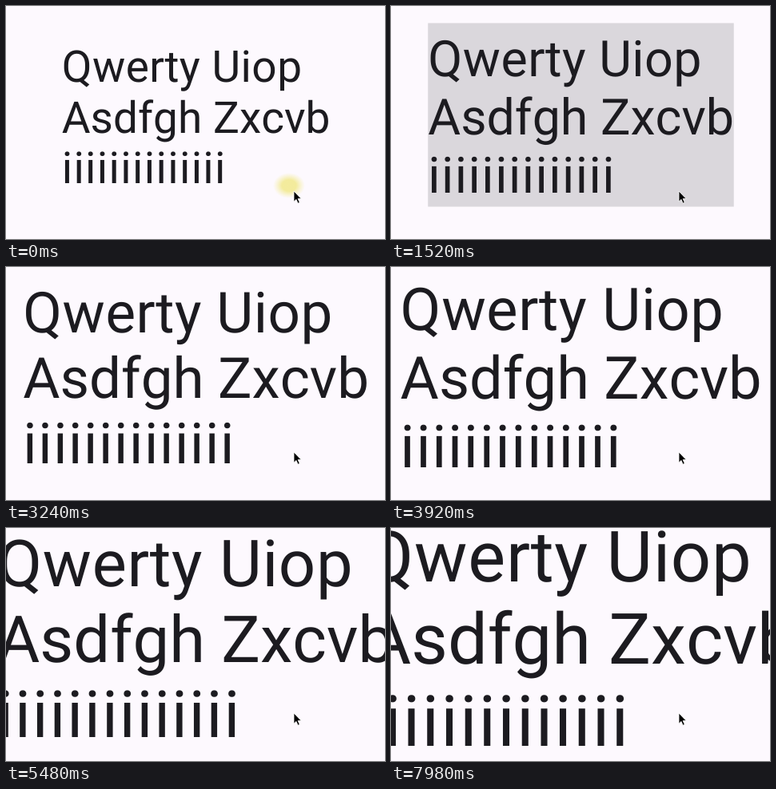
Write an HTML page that moves like this. It is 474 by 292 pixels and loops after 8 s.

```html
<!DOCTYPE html>
<html lang="en">
<head>
<meta charset="utf-8">
<title>Growing text</title>
<style>
  html, body { margin: 0; width: 100%; height: 100%; overflow: hidden; background: #fdf9fe; }
  svg { display: block; width: 474px; height: 292px; }
  text {
    font: 400 100px Roboto, sans-serif;
    font-kerning: none;
    text-rendering: geometricPrecision;
    fill: #1c1b20;
  }
</style>
</head>
<body>
<svg viewBox="0 0 474 292">
  <defs>
    <radialGradient id="ink" gradientUnits="userSpaceOnUse">
      <stop offset="0" stop-color="#bebcc1"/>
      <stop offset=".72" stop-color="#bfbdc1"/>
      <stop offset=".92" stop-color="#ccc5ca"/>
      <stop offset="1" stop-color="#d5d0d5" stop-opacity="0"/>
    </radialGradient>
    <radialGradient id="glow">
      <stop offset=".45" stop-color="#f3eb9c"/>
      <stop offset="1" stop-color="#f6efb0" stop-opacity="0"/>
    </radialGradient>
  </defs>
  <rect id="hover" fill="#dad7dc"/>
  <rect id="ripple" fill="url(#ink)"/>
  <ellipse id="tap" cx="354" cy="225" rx="20" ry="16" fill="url(#glow)"/>
  <g id="lines">
    <text y="-81.7" letter-spacing=".8">Qwerty Uiop</text>
    <text y="34.5">Asdfgh Zxcvb</text>
    <text y="150.7" letter-spacing="2.45">iiiiiiiiiiiiii</text>
  </g>
  <path d="M360 232v13.2l3-2.8 2.1 4.9 2.2-1-2.1-4.7h4z" fill="#000" stroke="#fff" stroke-width=".8"/>
</svg>
<script>
const LOOP = 8000, STEP = 840, GROW = 740, LEAD = 20;
const CX = 237.5, CY = 139.6, HALF = 3.051;
const FIRST = 54.9, GAIN = 4, LAST = 88.5;

const el = id => document.getElementById(id);
const clamp = v => Math.min(1, Math.max(0, v));
const ramp = (t, a, b) => clamp((t - a) / (b - a));
const mix = (a, b, k) => a + (b - a) * k;
const set = (node, attrs) => {
  for (const key in attrs) node.setAttribute(key, attrs[key]);
};

const lines = el('lines'), hover = el('hover'), ripple = el('ripple');
const ink = el('ink'), tap = el('tap');

// Font size after n steps, and its linear growth within a step
const sizeAfter = n => Math.min(FIRST + GAIN * n, LAST);

function sizeAt(t) {
  const n = Math.floor((t + LEAD) / STEP);
  const k = clamp((t + LEAD - n * STEP) / GROW);
  return mix(sizeAfter(n), sizeAfter(n + 1), k);
}

function draw(t) {
  const s = sizeAt(t), left = CX - HALF * s;
  set(lines, { transform: `translate(${left} ${CY}) scale(${s / 100})` });

  const box = { x: left, y: CY - 1.885 * s, width: 2 * HALF * s, height: 3.67 * s };
  set(hover, { ...box, opacity: ramp(t, 20, 200) * (1 - ramp(t, 1700, 2200)) });

  const k = 1 - (1 - ramp(t, 40, 700)) ** 2;
  set(ink, { cx: mix(356, 238, k), cy: mix(230, 137, k), r: mix(10, 225, k) });
  set(ripple, { ...box, opacity: ramp(t, 40, 140) * (1 - ramp(t, 740, 1150)) });

  set(tap, { opacity: 1 - ramp(t, 0, 160) });
}

const start = performance.now();
function tick() {
  draw((performance.now() - start) % LOOP);
  requestAnimationFrame(tick);
}
tick();
</script>
</body>
</html>
```
